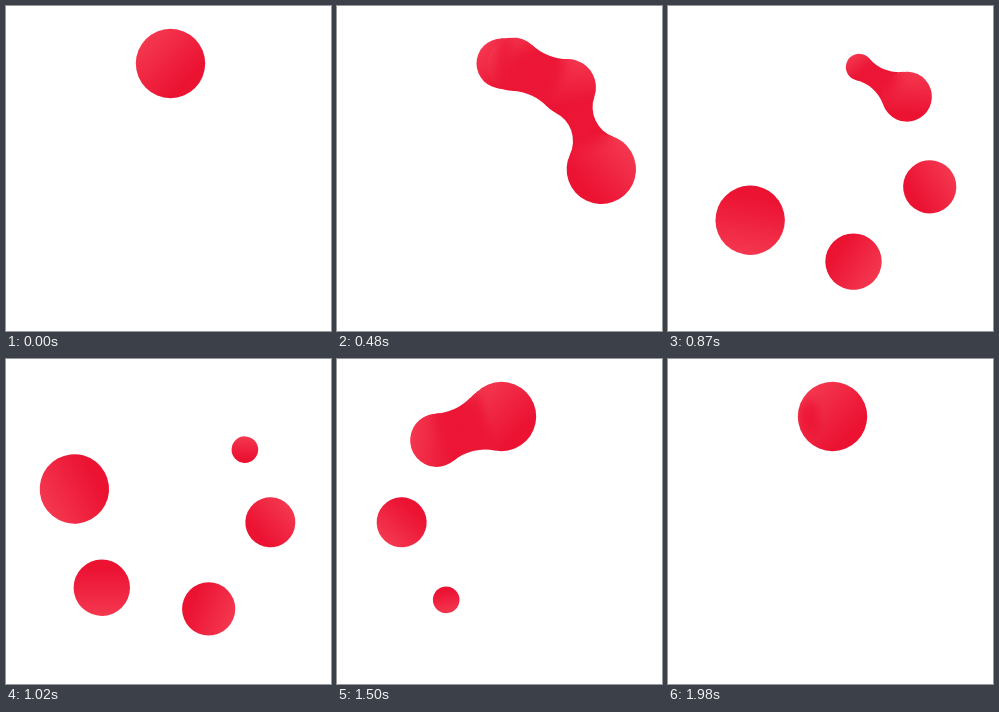
Animation, 325 px wide and 325 px high, one loop 2130 ms. Source, as an HTML page with a canvas:

```html
<!DOCTYPE html>
<html>
<head>
<meta charset="utf-8">
<style>
  html, body { margin: 0; width: 100%; height: 100%; overflow: hidden; background: #fff; }
  canvas { display: block; }
</style>
</head>
<body>
<canvas id="stage" width="325" height="325"></canvas>
<script>
const ctx = document.getElementById('stage').getContext('2d');
const CX = 164.5, CY = 157.5, ORBIT = 100;
const TURN = 1440, LOOP = 2130, STEP = 30, LAST = 1980;
const LIGHT = '#f4374f', DARK = '#eb1232', JOINT = '#ed1535';
// Radius, delay and sideways shift of the orbit.
const drops = [[34.7, 0, 0], [28.2, 180, 1.5], [26.6, 360, 0], [25, 540, 0], [13.3, 690, 0]]
  .map(([r, delay, shift]) => ({ r, delay, shift }));

function place(drop, t) {
  const u = Math.min(1, Math.max(0, (t - drop.delay) / TURN));
  drop.angle = 2 * Math.PI * u * u * (3 - 2 * u);
  drop.x = CX + drop.shift + ORBIT * Math.sin(drop.angle);
  drop.y = CY - ORBIT * Math.cos(drop.angle);
}

function drawDrop({ x, y, r, angle }) {
  ctx.save();
  ctx.translate(x, y);
  ctx.rotate(angle);
  const k = r * 0.7;
  const fill = ctx.createLinearGradient(-k, -k, k, k);
  fill.addColorStop(0, LIGHT);
  fill.addColorStop(0.85, DARK);
  ctx.fillStyle = fill;
  ctx.beginPath();
  ctx.arc(0, 0, r, 0, 2 * Math.PI);
  ctx.fill();
  ctx.restore();
}

// Joins two drops with a neck whose sides are arcs tangent to both;
// the closer the drops, the flatter the arcs.
function drawNeck(a, b) {
  const dx = b.x - a.x, dy = b.y - a.y, d = Math.hypot(dx, dy);
  if (d <= Math.abs(a.r - b.r) + 0.01) return;
  const rho = 60 * Math.exp((a.r + b.r - d) / 40);
  const p = a.r + rho, q = b.r + rho;
  const x = (p * p - q * q + d * d) / (2 * d);
  const h = Math.sqrt(p * p - x * x);
  if (!(h > 0) || (h < rho && x > 0 && x < d)) return;
  const toA = Math.atan2(h, -x), toB = Math.atan2(h, d - x);
  ctx.save();
  ctx.translate(a.x, a.y);
  ctx.rotate(Math.atan2(dy, dx));
  ctx.fillStyle = JOINT;
  ctx.beginPath();
  ctx.arc(x, h, rho, -toA, -toB);
  ctx.arc(x, -h, rho, toB, toA);
  ctx.fill();
  ctx.restore();
}

function drawNecks() {
  drops.forEach((a, i) => drops.slice(i + 1).forEach(b => drawNeck(a, b)));
}

function frame(now) {
  const t = Math.min(LAST, Math.floor(now % LOOP / STEP) * STEP);
  drops.forEach(drop => place(drop, t));
  ctx.clearRect(0, 0, 325, 325);
  drawNecks();
  [...drops].reverse().forEach(drawDrop);
  // Soften the colour where drops meet, without growing the outline.
  ctx.save();
  ctx.globalCompositeOperation = 'source-atop';
  ctx.filter = 'blur(6px)';
  drawNecks();
  ctx.restore();
  requestAnimationFrame(frame);
}
requestAnimationFrame(frame);
</script>
</body>
</html>
```
